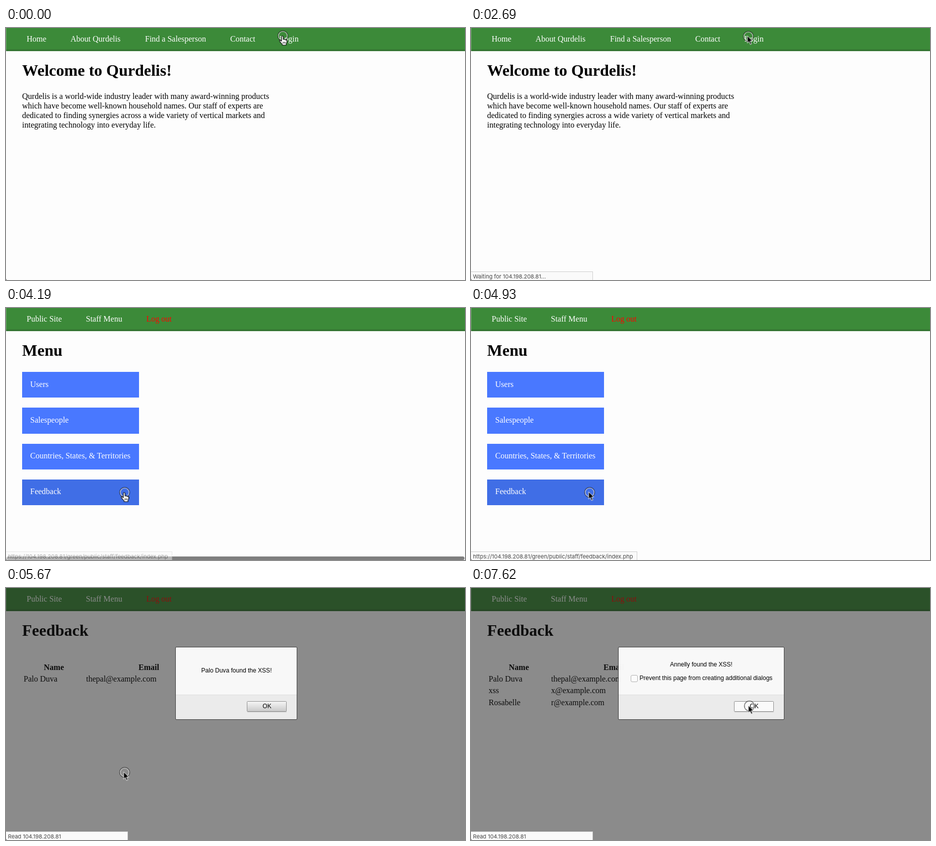
An HTML page that plays this animation: 911x501 px, repeating every 8000 ms.

```html
<!DOCTYPE html>
<html lang="en">
<head>
<meta charset="utf-8">
<title>Feedback page demo</title>
<style>
html, body { margin: 0; width: 100%; height: 100%; overflow: hidden; background: #fdfdfd; }
svg { display: block; width: 911px; height: 501px; }
text { font: 16px "Liberation Serif", Times, serif; white-space: pre; }
.h1 { font-size: 32px; font-weight: 700; }
.th { font-weight: 700; }
.nav text, .menu text { fill: #fff; }
.nav .out { fill: #f00; }
.menu rect { fill: #4978ff; }
.dialog text { font: 12.05px "Liberation Sans", Helvetica, sans-serif; }
.mid { text-anchor: middle; }
.status rect { fill: #fafafa; stroke: #cdcdcd; }
.status text { font: 11px Inter, sans-serif; fill: #484848; }
.panel { fill: #fafafa; fill-opacity: .98; }
.foot { fill: #ebebeb; }
.edge { fill: none; stroke: #3d3d3d; }
.btn { fill: url(#face); stroke: #8e8e8e; }
.lit { fill: #fafafa; }

/* Every change is a hard cut on an 8 s clock. */
.t { opacity: 0; animation: 8s step-end infinite; }
#home { animation-name: home; }
#menu { animation-name: menu; }
#feedback, #read { animation-name: feedback; }
#over { animation-name: over; }
#bar { animation-name: bar; }
#connect { animation-name: connect; }
#wait { animation-name: wait; }
#link { animation-name: link; }
#first { animation-name: first; }
#firstLit { animation-name: firstLit; }
#second, #row2 { animation-name: second; }
#secondLit { animation-name: secondLit; }
#row3 { animation-name: row3; }
#hand { animation-name: hand; }
#arrow { animation-name: arrow; }
#pointer { animation: move 8s step-end infinite; }

@keyframes home { 0% { opacity: 1 } 35.5%, 100% { opacity: 0 } }
@keyframes menu { 0% { opacity: 0 } 35.5% { opacity: 1 } 63.375%, 100% { opacity: 0 } }
@keyframes feedback { 0% { opacity: 0 } 63.375%, 100% { opacity: 1 } }
@keyframes over { 0% { opacity: 0 } 50.5% { opacity: 1 } 63.375%, 100% { opacity: 0 } }
@keyframes bar {
  0% { opacity: 0 } 35.5% { opacity: 1 } 57.875% { opacity: .5 } 59.75% { opacity: 0 }
  63.375% { opacity: 1 } 69% { opacity: .5 } 70.875%, 100% { opacity: 0 }
}
@keyframes connect { 0% { opacity: 0 } 1.875% { opacity: 1 } 33.625%, 100% { opacity: 0 } }
@keyframes wait { 0% { opacity: 0 } 33.625% { opacity: 1 } 35.5%, 100% { opacity: 0 } }
@keyframes link { 0% { opacity: 0 } 52.375% { opacity: .45 } 54.25% { opacity: 1 } 63.375%, 100% { opacity: 0 } }
@keyframes first { 0% { opacity: 0 } 63.375% { opacity: 1 } 85.875%, 100% { opacity: 0 } }
@keyframes firstLit { 0% { opacity: 0 } 82.125%, 100% { opacity: 1 } }
@keyframes second { 0% { opacity: 0 } 85.875%, 100% { opacity: 1 } }
@keyframes secondLit { 0% { opacity: 0 } 91.5%, 100% { opacity: 1 } }
@keyframes row3 { 0% { opacity: 0 } 95.25%, 100% { opacity: 1 } }
@keyframes hand { 0% { opacity: 1 } 3.75% { opacity: 0 } 50.5% { opacity: 1 } 61.625%, 100% { opacity: 0 } }
@keyframes arrow { 0% { opacity: 0 } 3.75% { opacity: 1 } 50.5% { opacity: 0 } 61.625%, 100% { opacity: 1 } }
@keyframes move {
  0% { transform: translate(549.5px, 15.5px) }
  1.875% { transform: translate(550.5px, 16.5px) }
  41.125% { transform: translate(537px, 36px) }
  43% { transform: translate(480px, 112px) }
  44.875% { transform: translate(397px, 208px) }
  46.75% { transform: translate(322px, 290px) }
  48.625% { transform: translate(270px, 344px) }
  50.5% { transform: translate(241px, 363px) }
  52.375% { transform: translate(235.5px, 366.5px) }
  74.625% { transform: translate(258px, 350px) }
  76.5% { transform: translate(360px, 281px) }
  78.375% { transform: translate(456px, 229px) }
  80.25% { transform: translate(503px, 216px) }
  82.125% { transform: translate(516.5px, 234.5px) }
  91.5%, 100% { transform: translate(552.5px, 234.5px) }
}
</style>
</head>
<body>
<svg viewBox="0 0 911 501">
  <defs>
    <linearGradient id="face" x2="0" y2="1">
      <stop stop-color="#f6f6f6"/>
      <stop offset="1" stop-color="#c9c9c9"/>
    </linearGradient>
  </defs>

  <rect width="911" height="501" fill="#fdfdfd"/>
  <rect width="911" height="46" fill="#3c8a39"/>
  <rect y="42.5" width="911" height="3.5" fill="#347533"/>
  <rect width="1" height="46" fill="#fff" opacity=".25"/>

  <g id="home" class="t">
    <g class="nav">
      <text x="41" y="27">Home</text>
      <text x="128" y="27">About Qurdelis</text>
      <text x="276" y="27">Find a Salesperson</text>
      <text x="445" y="27">Contact</text>
      <text x="542.5" y="27">Login</text>
    </g>
    <text class="h1" x="32" y="95">Welcome to Qurdelis!</text>
    <text x="32" y="141">Qurdelis is a world-wide industry leader with many award-winning products</text>
    <text x="32" y="160">which have become well-known household names. Our staff of experts are</text>
    <text x="32" y="179">dedicated to finding synergies across a wide variety of vertical markets and</text>
    <text x="32" y="198">integrating technology into everyday life.</text>
  </g>

  <g id="menu" class="t">
    <g class="nav">
      <text x="41" y="27">Public Site</text>
      <text x="158.5" y="27">Staff Menu</text>
      <text class="out" x="278.5" y="27">Log out</text>
    </g>
    <text class="h1" x="32" y="95">Menu</text>
    <g class="menu">
      <rect x="32" y="127" width="232" height="51"/>
      <rect x="32" y="198" width="232" height="52"/>
      <rect x="32" y="270" width="232" height="51"/>
      <rect x="32" y="341" width="232" height="51"/>
      <rect id="over" class="t" x="32" y="341" width="232" height="51" style="fill:#406ee6"/>
      <text x="48" y="157">Users</text>
      <text x="48" y="228">Salespeople</text>
      <text x="48" y="299">Countries, States, &amp; Territories</text>
      <text x="48" y="370">Feedback</text>
    </g>
  </g>

  <g id="feedback" class="t">
    <g class="nav">
      <text x="41" y="27">Public Site</text>
      <text x="158.5" y="27">Staff Menu</text>
      <text class="out" x="278.5" y="27">Log out</text>
    </g>
    <text class="h1" x="32" y="95">Feedback</text>
    <text class="th" x="75" y="163">Name</text>
    <text class="th" x="263" y="163">Email</text>
    <text x="35" y="186">Palo Duva</text>
    <text x="159" y="186">thepal@example.com</text>
    <g id="row2" class="t">
      <text x="35" y="209">xss</text>
      <text x="159" y="209">x@example.com</text>
    </g>
    <g id="row3" class="t">
      <text x="35" y="233">Rosabelle</text>
      <text x="159" y="233">r@example.com</text>
    </g>
  </g>

  <rect id="bar" class="t" x="1" y="494" width="909" height="7" rx="3.5" fill="#7f7f7f"/>
  <rect class="t" style="animation-name:feedback" width="911" height="501" fill="#1a1a1a" fill-opacity=".5"/>

  <g id="first" class="t dialog">
    <rect class="panel" x="337" y="118" width="240" height="143"/>
    <rect class="foot" x="337" y="212" width="240" height="49"/>
    <path d="M337 212.5h240" stroke="#dcdcdc"/>
    <rect class="edge" x="336.5" y="117.5" width="241" height="144" rx="1.5"/>
    <text class="mid" x="457.5" y="168">Palo Duva found the XSS!</text>
    <path d="M479 246.5h78" stroke="#c4c4c4"/>
    <rect class="btn" x="478.5" y="225.5" width="78" height="20" rx="1"/>
    <rect id="firstLit" class="t lit" x="479" y="226" width="77" height="19"/>
    <text class="mid" x="518" y="239">OK</text>
  </g>

  <g id="second" class="t dialog">
    <rect class="panel" x="293" y="118" width="328" height="143"/>
    <rect class="foot" x="293" y="212" width="328" height="49"/>
    <path d="M293 212.5h328" stroke="#dcdcdc"/>
    <rect class="edge" x="292.5" y="117.5" width="329" height="144" rx="1.5"/>
    <text class="mid" x="457" y="156">Annelly found the XSS!</text>
    <rect x="317.5" y="173.5" width="13" height="13" rx="2.5" fill="#fbfbfb" stroke="#b0b0b0"/>
    <text x="334.5" y="183">Prevent this page from creating additional dialogs</text>
    <path d="M523 246.5h78" stroke="#c4c4c4"/>
    <rect class="btn" x="522.5" y="225.5" width="78" height="20" rx="1"/>
    <rect id="secondLit" class="t lit" x="523" y="226" width="77" height="19"/>
    <text class="mid" x="562" y="239">OK</text>
  </g>

  <g class="status">
    <g id="connect" class="t">
      <rect x="-1" y="484.5" width="242.5" height="18"/>
      <text x="4" y="498">Connecting to 104.198.208.81...</text>
    </g>
    <g id="wait" class="t">
      <rect x="-1" y="484.5" width="242.5" height="18"/>
      <text x="4" y="498">Waiting for 104.198.208.81...</text>
    </g>
    <g id="link" class="t">
      <rect x="-1" y="484.5" width="330.5" height="18"/>
      <text x="4" y="498">https://104.198.208.81/green/public/staff/feedback/index.php</text>
    </g>
    <g id="read" class="t">
      <rect x="-1" y="484.5" width="242.5" height="18"/>
      <text x="4" y="498">Read 104.198.208.81</text>
    </g>
  </g>
  <rect y="499" width="1" height="2" fill="#666"/>

  <g id="pointer">
    <circle r="9.8" fill="none" stroke="#000" stroke-width="1.1"/>
    <circle r="8.8" fill="none" stroke="#fff" stroke-width="1.1"/>
    <g id="hand" class="t" stroke="#000" stroke-linejoin="round">
      <path fill="#fff" stroke-width="1.2" d="M-2.6 10.5V2.2a1.7 1.7 0 0 1 3.4 0V7.2q1.6-1 2.7.5 1.6-.8 2.5.8 2.2-.4 2.2 1.8 0 3.2-1.6 5.2V18.5H-1.2V16.6Q-3.6 14.5-6.6 10.6q-.9-1.8.9-1.9 1.5.1 3.1 1.8z"/>
      <path fill="none" stroke-width=".9" d="M.4 12v3.4M2.5 12v3.4M4.6 12v3.4"/>
    </g>
    <path id="arrow" class="t" stroke="#fff" stroke-linejoin="round" d="M-2-1V13.4l3.3-3.1 2.5 5.9 2.5-1.1-2.5-5.7H8.2z"/>
  </g>
</svg>
</body>
</html>
```
